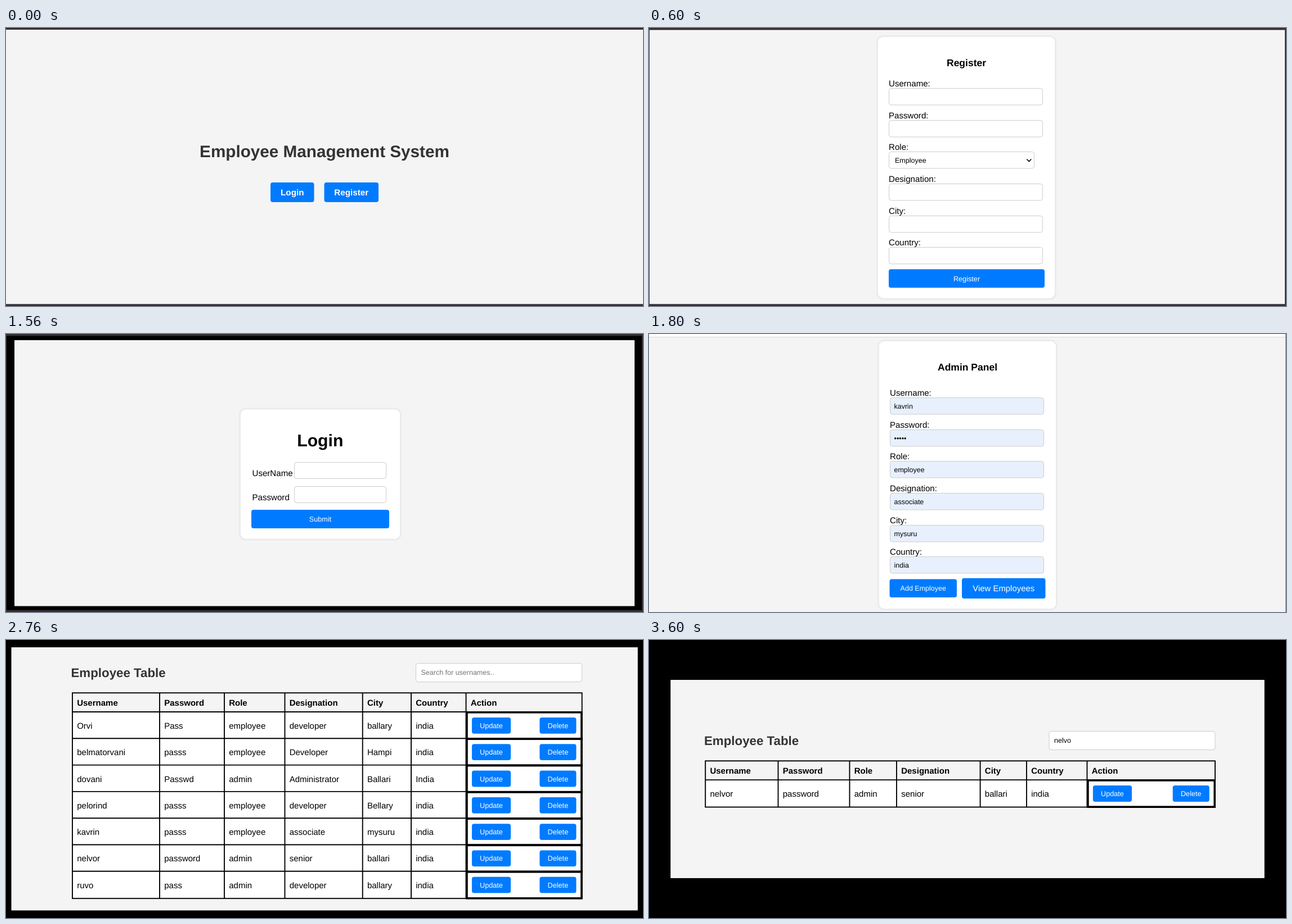
An HTML page with a canvas that plays this animation: 1132x495 px, repeating every 4.2 s.

```html
<!DOCTYPE html>
<html lang="en">
<head>
<meta charset="utf-8">
<title>Employee Management System</title>
<style>
  html, body { margin: 0; width: 100%; height: 100%; overflow: hidden; background: #000; }
  canvas { display: block; }
</style>
</head>
<body>
<canvas id="stage" width="1132" height="495"></canvas>
<script>
const ctx = document.getElementById('stage').getContext('2d');
const W = 1132, H = 495, SLIDE_MS = 600;
const PAGE = '#f4f4f4', FRAME = '#332f33', BLUE = '#007bff', FILLED = '#e8f0fe';
const LABEL = 15.1, FIELD = 12.5, BUTTON = 12.7;

function box(left, top, right, bottom, color) {
  ctx.fillStyle = color;
  ctx.fillRect(left, top, right - left, bottom - top);
}

function rounded(left, top, right, bottom, radius, color) {
  ctx.beginPath();
  ctx.roundRect(left, top, right - left, bottom - top, radius);
  ctx.fillStyle = color;
  ctx.fill();
}

// `middle` is the vertical centre of the capital letters.
function text(str, x, middle, size, { bold = false, color = '#000', align = 'left' } = {}) {
  ctx.font = `${bold ? 'bold ' : ''}${size}px "Liberation Sans", Arial, sans-serif`;
  ctx.textAlign = align;
  ctx.fillStyle = color;
  ctx.fillText(str, x, middle + size * 0.355);
}

function heading(str, x, middle, size, color = '#000') {
  text(str, x, middle, size, { bold: true, align: 'center', color });
}

function card(left, top, right, bottom) {
  rounded(left - 3, top - 3, right + 3, bottom + 3, 12, '#ebebeb');
  rounded(left, top, right, bottom, 9, '#fff');
}

function button(str, left, top, right, bottom, size = BUTTON, bold = false) {
  rounded(left, top, right, bottom, 4, BLUE);
  text(str, (left + right) / 2, (top + bottom) / 2, size, { bold, color: '#fff', align: 'center' });
}

function field(left, top, right, bottom, fill = '#fff') {
  ctx.beginPath();
  ctx.roundRect(left + 0.5, top + 0.5, right - left - 1, bottom - top - 1, 4);
  ctx.fillStyle = fill;
  ctx.fill();
  ctx.strokeStyle = '#ccc';
  ctx.lineWidth = 1;
  ctx.stroke();
}

function form(left, firstMiddle, labels, values = []) {
  labels.forEach((label, i) => {
    const middle = firstMiddle + i * 56.55;
    const top = Math.round(middle + 8.3);
    const isSelect = values[i] === 'Employee';
    text(label + ':', left, middle, LABEL);
    field(left, top, left + (isSelect ? 259 : 274), top + 30.5,
          values[i] && !isSelect ? FILLED : '#fff');
    if (values[i]) text(values[i], left + (isSelect ? 11 : 7.5), top + 15.2, FIELD);
    if (isSelect) chevron(left + 249.3, top + 15.5);
  });
}

function chevron(x, y) {
  ctx.beginPath();
  ctx.moveTo(x - 4, y - 2);
  ctx.lineTo(x, y + 2);
  ctx.lineTo(x + 4, y - 2);
  ctx.strokeStyle = '#000';
  ctx.lineWidth = 1.7;
  ctx.stroke();
}

const COLUMNS = ['Username', 'Password', 'Role', 'Designation', 'City', 'Country', 'Action'];
const EMPLOYEES = [
  'Orvi Pass employee developer ballary india',
  'belmatorvani passs employee Developer Hampi india',
  'dovani Passwd admin Administrator Ballari India',
  'pelorind passs employee developer Bellary india',
  'kavrin passs employee associate mysuru india',
  'nelvor password admin senior ballari india',
  'ruvo pass admin developer ballary india'
].map(row => row.split(' '));

function table(edges, top, rows) {
  const left = edges[0], right = edges[7], action = edges[6];
  const rowTop = i => top + 33.8 + i * 47.3;
  const bottom = rowTop(rows.length) + 1.1;
  box(left, rowTop(0), right, bottom, '#fff');

  ctx.strokeStyle = '#000';
  ctx.lineWidth = 1.9;
  ctx.strokeRect(left, top, right - left, bottom - top);
  ctx.beginPath();
  edges.slice(1, 7).forEach(x => { ctx.moveTo(x, top); ctx.lineTo(x, bottom); });
  rows.forEach((_, i) => { ctx.moveTo(left, rowTop(i)); ctx.lineTo(right, rowTop(i)); });
  ctx.stroke();

  COLUMNS.forEach((name, i) => text(name, edges[i] + 8.2, top + 17, 15, { bold: true }));
  rows.forEach((row, i) => {
    const y = rowTop(i);
    row.forEach((value, j) => text(value, edges[j] + 8.2, y + 24.6, 15));
    ctx.lineWidth = 3.6;
    ctx.strokeRect(action + 1.4, y + 0.8, right - action - 2.2, 47.3);
    button('Update', action + 10.4, y + 10, action + 79.5, y + 38.8);
    button('Delete', right - 75.3, y + 10, right - 10.2, y + 38.8);
  });
}

function tableHeader(left, middle, query, queryColor) {
  text('Employee Table', left - 1.5, middle, 22.3, { bold: true, color: '#333' });
  field(left + 611, middle - 17, left + 907, middle + 17);
  text(query, left + 620.5, middle, FIELD, { color: queryColor });
}

function home() {
  box(0, 0, W, H, FRAME);
  box(0, 3, W, 491.5, PAGE);
  heading('Employee Management System', 566, 219, 29.7, '#333');
  button('Login', 470, 275, 547.5, 310, 15.2, true);
  button('Register', 565.5, 275, 662, 310, 15.2, true);
}

function register() {
  box(0, 0, W, H, FRAME);
  box(1, 3.5, 1130, 491.5, PAGE);
  card(407, 16, 721, 481);
  heading('Register', 564, 61.3, 17.5);
  form(426, 99, ['Username', 'Password', 'Role', 'Designation', 'City', 'Country'],
       ['', '', 'Employee']);
  button('Register', 426, 429.5, 703, 462.5);
}

function login() {
  box(0, 0, W, H, FRAME);
  box(1, 3.5, 1130, 491.5, '#000');
  box(15, 11, 1117, 484.5, PAGE);
  card(417, 134.5, 700, 364.5);
  heading('Login', 558.3, 189.5, 30.2);
  text('UserName', 437.5, 248, LABEL);
  field(512, 228, 676, 258);
  text('Password', 437.5, 291, LABEL);
  field(512, 271, 676, 301);
  button('Submit', 436, 313, 681, 346);
}

function adminPanel() {
  box(0, 0, W, H, PAGE);
  box(0, 0, W, 5, '#fff');
  box(0, 5, W, 6, '#d8d8d8');
  box(1131, 0, W, H, '#777');
  card(409, 13, 723, 489);
  heading('Admin Panel', 566, 58.5, 17.5);
  form(428, 105, ['Username', 'Password', 'Role', 'Designation', 'City', 'Country'],
       ['kavrin', '•••••', 'employee', 'associate', 'mysuru', 'india']);
  button('Add Employee', 427.5, 436.5, 547, 469, FIELD);
  button('View Employees', 556, 434.7, 704.5, 471, 14.9);
}

function employeeTable() {
  box(0, 0, W, H, '#000');
  box(9.5, 13, 1122.7, 481.5, PAGE);
  tableHeader(117, 58, 'Search for usernames..', '#757575');
  table([118, 273, 388, 495.5, 633.7, 720, 817.5, 1023.6], 94.2, EMPLOYEES);
}

function updateEmployee() {
  box(0, 0, W, H, '#000');
  box(307, 11, 824.5, 484.5, PAGE);
  card(395, 44.5, 709, 460);
  heading('Update Employee', 552, 95, 22.4);
  form(413.7, 134.4, ['Password', 'Role', 'Designation', 'City', 'Country']);
  button('Update', 413.5, 408, 690.5, 440.5);
}

function searchResult() {
  box(0, 0, W, H, '#000');
  box(38.3, 71, 1093.7, 424, PAGE);
  tableHeader(99.5, 179, 'nelvo', '#000');
  table([100.2, 229.5, 356.5, 440, 588.6, 671, 778.5, 1006], 215.3, [EMPLOYEES[5]]);
}

const slides = [home, register, login, adminPanel, employeeTable, updateEmployee, searchResult];
let shown = -1;

function render() {
  const index = Math.floor(performance.now() / SLIDE_MS) % slides.length;
  if (index !== shown) {
    slides[index]();
    shown = index;
  }
  requestAnimationFrame(render);
}

ctx.textRendering = 'geometricPrecision';
render();
</script>
</body>
</html>
```
